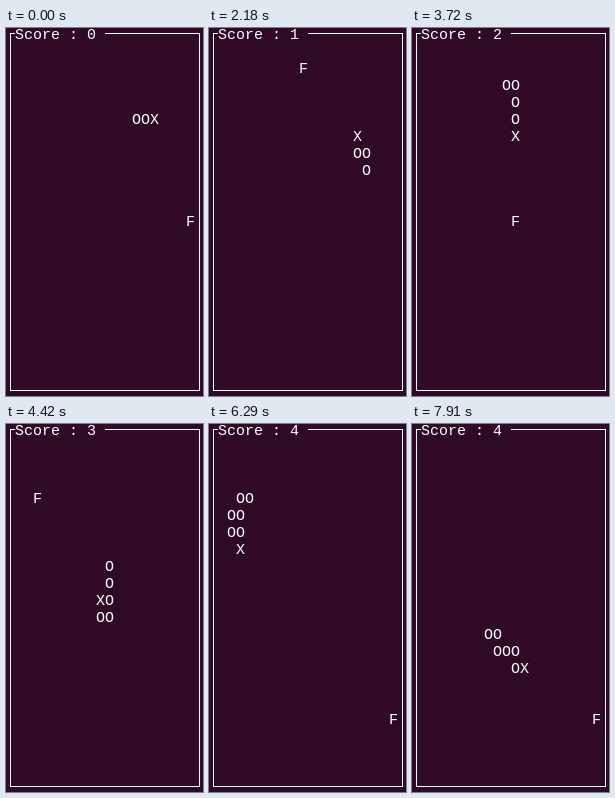
An HTML page with a canvas that plays this animation: 197 px wide and 368 px high, repeating every 8 s.

```html
<!DOCTYPE html>
<html lang="en">
<head>
<meta charset="utf-8">
<title>Terminal snake</title>
<style>
  html, body { margin: 0; height: 100%; overflow: hidden; background: #300a24; }
  canvas { display: block; }
</style>
</head>
<body>
<canvas id="stage" width="197" height="368"></canvas>
<script>
const ctx = document.getElementById('stage').getContext('2d');
const LOOP = 8000, TICK = 102.7, CELL_W = 9, CELL_H = 17;

const foods = [[20, 11], [10, 2], [11, 11], [3, 4], [20, 17]];
const [first, second, third, fourth] = foods;
const turns = [[20, 10], [19, 11], first, second, third, fourth,
  [2, 6], [3, 6], [9, 13], [11, 13], [12, 14]];

// The snake zigzags to each point: it turns every step until it is in line.
const path = [[14, 5], [15, 5], [16, 5]];
const scores = [0];
let [x, y] = path[2], vertical = false, eaten = 0;
for (const [goalX, goalY] of turns) {
  while (x !== goalX || y !== goalY) {
    vertical = x === goalX || (!vertical && y !== goalY);
    if (vertical) y += Math.sign(goalY - y);
    else x += Math.sign(goalX - x);
    path.push([x, y]);
    if (x === foods[eaten][0] && y === foods[eaten][1]) eaten++;
    scores.push(eaten);
  }
}

function put(text, [col, row]) {
  ctx.fillText(text, col * CELL_W, row * CELL_H + 11);
}

function draw(ms) {
  const step = Math.floor(ms / TICK), score = scores[step];
  ctx.fillStyle = '#300a24';
  ctx.fillRect(0, 0, 197, 368);

  ctx.strokeStyle = ctx.fillStyle = '#fff';
  ctx.strokeRect(4.5, 5.5, 189, 357);
  ctx.clearRect(9, 5, 90, 1);

  ctx.font = '15px "Liberation Mono", monospace';
  put(`Score : ${score}`, [1, 0]);
  put('F', foods[score]);
  const body = path.slice(step - score, step + 3);
  body.forEach((cell, i) => put(i === body.length - 1 ? 'X' : 'O', cell));
}

function tick() {
  draw(performance.now() % LOOP);
  requestAnimationFrame(tick);
}
tick();
</script>
</body>
</html>
```
